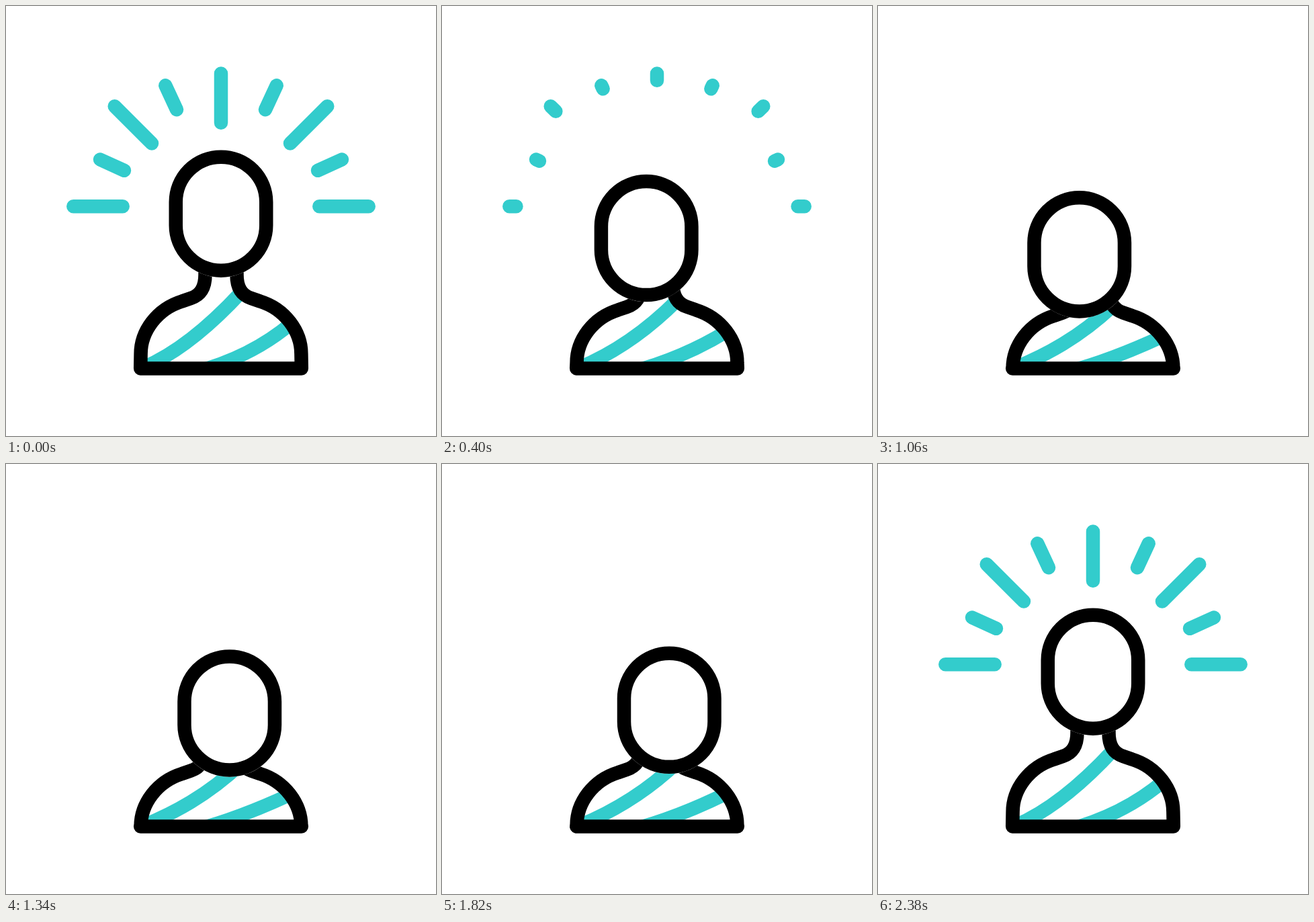
Recreate the animation shown at these times as an HTML page with a canvas. Size 640 by 640 pixels, loop 2.4 s.

```html
<!DOCTYPE html>
<html>
<head>
<meta charset="utf-8">
<style>
  html, body { margin: 0; width: 100%; height: 100%; overflow: hidden; background: #fff; }
  canvas { display: block; }
</style>
</head>
<body>
<canvas id="stage" width="640" height="640"></canvas>
<script>
const ctx = document.getElementById('stage').getContext('2d');
const LOOP = 2400, TEAL = '#33cccc', LINE = 20.5;

// Left half of the burst: outer end, inner end; mirrored for the right half.
const RAYS = [
  [100.3, 298.3, 173.7, 298.3],
  [140, 228.5, 176, 244.8],
  [161.7, 149.2, 217, 204.4],
  [237.3, 118.3, 254, 154.2],
  [320, 100.5, 320, 173.7]
];

const mix = (a, b, p) => a + (b - a) * p;

function ease(t, start, duration) {
  const u = Math.min(1, Math.max(0, (t - start) / duration));
  return u * u * (3 - 2 * u);
}

function stroke(path, color) {
  ctx.strokeStyle = color;
  ctx.stroke(path);
}

function drawRays(t) {
  const hide = ease(t, 106, 385), show = ease(t, 1850, 385);
  if (hide === 1 && show === 0) return;
  const path = new Path2D();
  for (const [ox, oy, ix, iy] of RAYS) {
    // Rays shrink toward the outer end and grow back from the inner end.
    const from = show > 0 ? 1 - show : 0;
    const to = show > 0 ? 1 : 1 - hide;
    const x1 = mix(ox, ix, from), y1 = mix(oy, iy, from);
    const x2 = mix(ox, ix, to), y2 = mix(oy, iy, to);
    path.moveTo(x1, y1);
    path.lineTo(x2, y2);
    if (ox < 320) {
      path.moveTo(640 - x1, y1);
      path.lineTo(640 - x2, y2);
    }
  }
  ctx.lineCap = 'round';
  stroke(path, TEAL);
}

function drawBody(squash) {
  const drop = 21.5 * squash;
  const y = v => v + drop;
  const body = new Path2D(`M296.5 ${y(386)} V${y(400)}
    C296.5 ${y(418)} 290 ${y(430)} 275 ${y(435)} L262 ${y(439.5)}
    C225 ${y(451)} 200.6 ${y(484)} 200.6 ${y(517.9)} L200.2 539.4 H439.8 L439.4 ${y(517.9)}
    C439.4 ${y(484)} 415 ${y(451)} 378 ${y(439.5)} L365 ${y(435)}
    C350 ${y(430)} 343.5 ${y(418)} 343.5 ${y(400)} V${y(386)}`);
  ctx.lineCap = 'butt';
  ctx.save();
  ctx.clip(body);
  stroke(new Path2D(`M200 540 C250 520 300 ${480 + 13 * squash} 350 ${426 + 20 * squash}
    M280 545 C330 532 380 ${510 + 2 * squash} 425 ${472 + 19 * squash}`), TEAL);
  ctx.restore();
  stroke(body, '#000');
}

function drawHead(x, y) {
  const outer = new Path2D(), ring = new Path2D();
  outer.roundRect(242.5 + x, 214.4 + y, 155, 189.6, 77.5);
  ring.roundRect(252.75 + x, 224.65 + y, 134.5, 169.1, 67.25);
  ctx.fillStyle = '#fff';
  ctx.fill(outer);
  stroke(ring, '#000');
}

function draw(t) {
  const down = ease(t, 87, 553), swing = ease(t, 968, 500), rise = ease(t, 1733, 511);
  const bow = 0.21 * down * (1 - down);
  const x = mix(-24.3 * (down + bow), 19.8, swing) * (1 - rise);
  const y = mix(60.5 * down, 62, swing) * (1 - rise);
  ctx.fillStyle = '#fff';
  ctx.fillRect(0, 0, 640, 640);
  ctx.lineWidth = LINE;
  ctx.lineJoin = 'round';
  drawRays(t);
  drawBody(down * (1 - rise));
  drawHead(x, y);
}

const begin = performance.now();
function tick() {
  draw((performance.now() - begin) % LOOP);
  requestAnimationFrame(tick);
}
tick();
</script>
</body>
</html>
```
